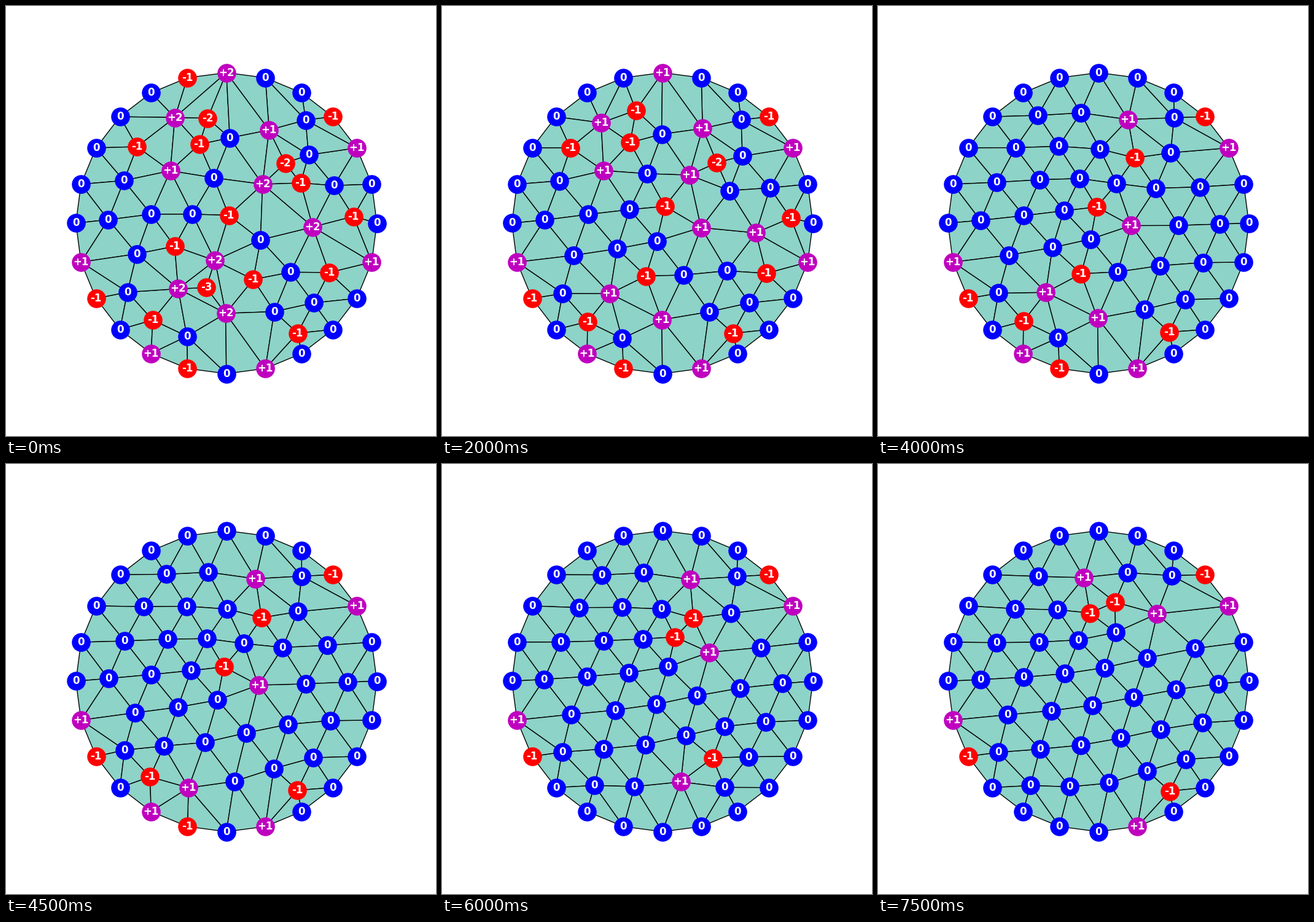
A matplotlib script that plays this animation: 700x700 px, repeating every 8 s.

```python
import numpy as np
import matplotlib.pyplot as plt
from matplotlib.animation import FuncAnimation
from matplotlib.collections import PolyCollection

STEP_MS = 500
SWEEPS = 3  # smoothing passes after each flip

# Hexagonal lattice, numbered row by row
SIDE = 5
sizes = [2 * SIDE - 1 - abs(k) for k in range(1 - SIDE, SIDE)]
COUNT = sum(sizes)
rows = [r.tolist() for r in np.split(np.arange(COUNT), np.cumsum(sizes)[:-1])]
ring = (rows[0] + [r[-1] for r in rows[1:-1]] + rows[-1][::-1]
        + [r[0] for r in rows[-2:0:-1]])
inner = np.setdiff1d(np.arange(COUNT), ring)

ideal = np.full(COUNT, 6)
ideal[ring] = 4
ideal[ring[::SIDE - 1]] = 3

# Lasting defects: (edge, length of the run of parallel edges flipped)
GLIDES = [((9, 15), 2), ((30, 39), 1), ((36, 43), 3), ((46, 47), 1),
          ((53, 54), 1)]
# Flips that tangle the mesh; the animation undoes them last to first
TANGLE = [(51, 57), (46, 52), (7, 8), (12, 13), (14, 15),
          (33, 41), (23, 31), (37, 46), (1, 7), (39, 46)]
# Flips tried once the tangle is gone; None takes back the detour
DETOUR = (47, 59)
WANDER = [(22, 31), DETOUR, (8, 14), None, (15, 23)]


def lattice():
    tris = []
    for upper, lower in zip(rows, rows[1:]):
        short, long = sorted((upper, lower), key=len)
        tris += zip(short, long, long[1:])
        tris += zip(short, short[1:], long[1:])
    return tris


def flip(tris, a, b):
    """Swap the diagonal a-b of its quad; return triangles and new diagonal."""
    pair = [t for t in tris if a in t and b in t]
    c, d = (next(v for v in t if v not in (a, b)) for t in pair)
    rest = [t for t in tris if t not in pair]
    return rest + [(a, c, d), (b, c, d)], (c, d)


def adjacency(tris):
    adj = np.zeros((COUNT, COUNT))
    for a, b, c in tris:
        for u, v in ((a, b), (b, c), (c, a)):
            adj[u, v] = adj[v, u] = 1
    return adj


def smooth(pos, adj, sweeps):
    mean = adj / adj.sum(axis=1, keepdims=True)
    pos = pos.copy()
    for _ in range(sweeps):
        pos[inner] = mean[inner] @ pos
    return pos


def tangled_mesh():
    """Return the starting triangles and the edges that untangle them."""
    tris, undo = lattice(), []
    for (a, b), run in GLIDES:
        for j in range(run):
            tris, _ = flip(tris, a + j, b + j)
    for edge in TANGLE:
        tris, diagonal = flip(tris, *edge)
        undo.insert(0, diagonal)
    return tris, undo


def build_states():
    tris, undo = tangled_mesh()
    angle = np.radians(120) - 2 * np.pi * np.arange(len(ring)) / len(ring)
    pos = np.zeros((COUNT, 2))
    pos[ring] = np.column_stack([np.cos(angle), np.sin(angle)])
    adj = adjacency(tris)
    pos = smooth(pos, adj, 1500)

    def state():
        return pos, np.array(tris), adj.sum(axis=1).astype(int) - ideal

    states, way_back = [state()], None
    for edge in undo + WANDER:
        tris, diagonal = flip(tris, *(edge or way_back))
        if edge == DETOUR:
            way_back = diagonal
        adj = adjacency(tris)
        pos = smooth(pos, adj, SWEEPS)
        states.append(state())
    return states


states = build_states()

fig, ax = plt.subplots(figsize=(7, 7), dpi=100)
ax.set_aspect("equal")
ax.set_xlim(-1.1, 1.1)
ax.set_ylim(-1.1, 1.1)
ax.axis("off")

mesh = PolyCollection([], facecolors="#8dd3c7", edgecolors="k", linewidths=1)
ax.add_collection(mesh, autolim=False)
dots = {sign: ax.plot([], [], color + "o", markersize=21, zorder=3)[0]
        for sign, color in ((-1, "r"), (0, "b"), (1, "m"))}
labels = [ax.text(0, 0, "", color="w", fontsize=12, fontweight="bold",
                  family="DejaVu Sans", ha="center", va="center", zorder=4)
          for _ in range(COUNT)]


def draw(i):
    pos, tris, excess = states[i]
    mesh.set_verts(pos[tris])
    for sign, dot in dots.items():
        dot.set_data(*pos[np.sign(excess) == sign].T)
    for label, xy, n in zip(labels, pos, excess):
        label.set_position(xy)
        label.set_text(f"{n:+d}" if n else "0")
    return [mesh, *dots.values(), *labels]


anim = FuncAnimation(fig, draw, frames=len(states), interval=STEP_MS,
                     repeat=True, repeat_delay=0)
plt.show()
```
